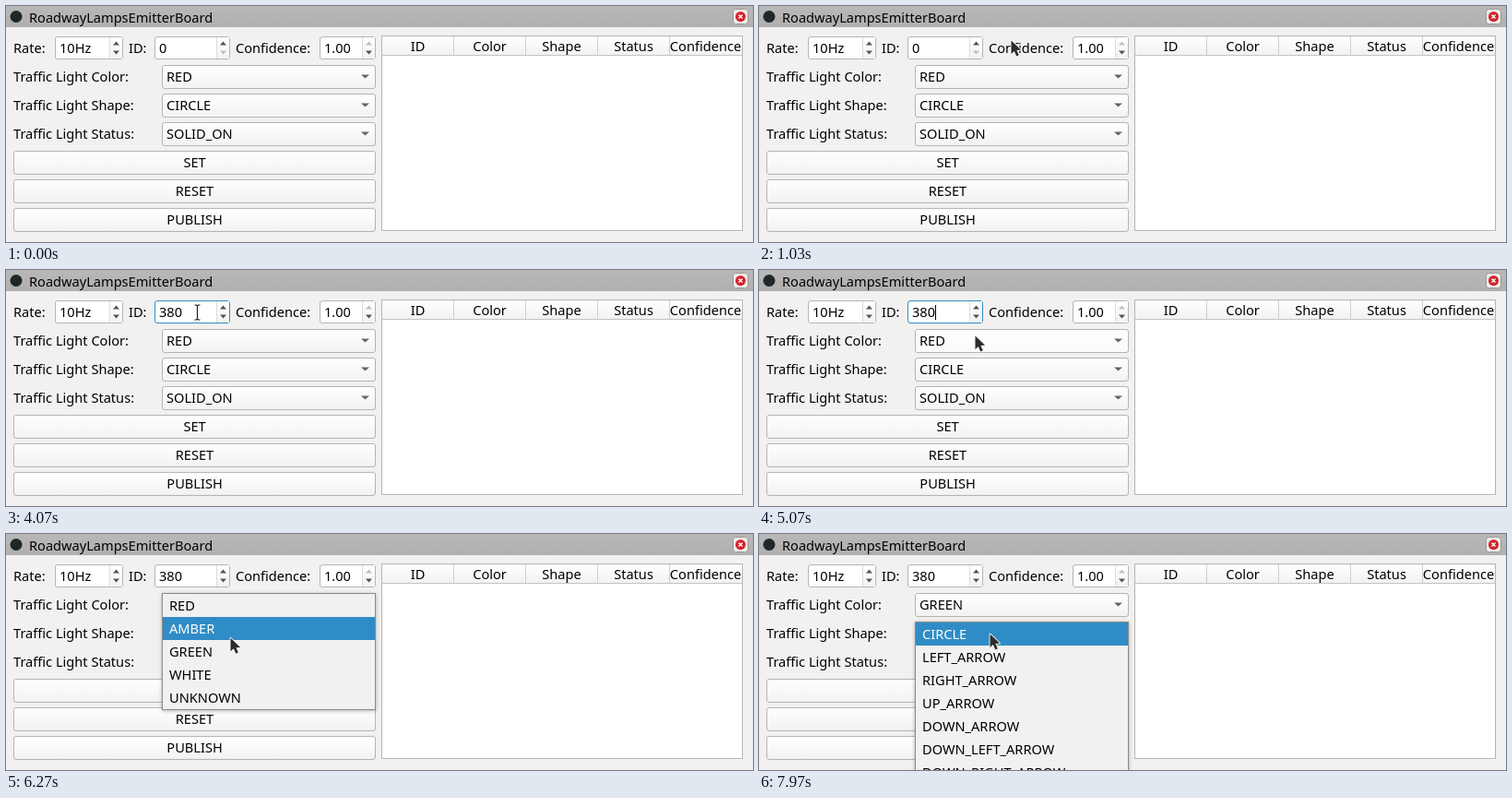
An HTML page with a canvas that plays this animation: 810 by 256 pixels, repeating every 8 s.

```html
<!DOCTYPE html>
<html lang="en">
<head>
<meta charset="utf-8">
<title>Panel</title>
<style>
html, body { margin: 0; width: 100%; height: 100%; overflow: hidden; background: #f2f1f0; }
canvas { display: block; width: 810px; height: 256px; }
</style>
</head>
<body>
<canvas id="stage" width="810" height="256"></canvas>
<script>
const ctx = document.getElementById('stage').getContext('2d');
const LOOP = 8000;
const INK = '#000', PANEL = '#f2f1f0', EDGE = '#b5b4b2', BLUE = '#308cc6';
const MARK = '#55554f', FADED = '#c0bfbd';
const COLORS = ['RED', 'AMBER', 'GREEN', 'WHITE', 'UNKNOWN'];
const SHAPES = ['CIRCLE', 'LEFT_ARROW', 'RIGHT_ARROW', 'UP_ARROW', 'DOWN_ARROW',
  'DOWN_LEFT_ARROW', 'DOWN_RIGHT_ARROW'];
const BLINK = 600;
const T = {
  focus: 1750, select: 1950, keys: [2570, 3170, 3470],
  openColor: 5200, pickColor: 6730, openShape: 7380
};
// Pointer moves: start, end, from, to; it rests in between
const MOVES = [
  [30, 1030, [814, 236], [273, 37]],
  [1030, 1500, [273, 37], [207, 46]],
  [4330, 4950, [207, 46], [234, 71]],
  [5900, 6450, [234, 71], [246, 126]],
  [6970, 7270, [246, 126], [250, 108]]
];

function pointer(t) {
  const [t0, t1, a, b] = MOVES.findLast(m => m[0] <= t) || MOVES[0];
  const u = Math.min(1, Math.max(0, (t - t0) / (t1 - t0)));
  const e = u * u * (3 - 2 * u);
  return a.map((v, i) => v + (b[i] - v) * e);
}

function rect(x, y, w, h, fill) {
  ctx.fillStyle = fill;
  ctx.fillRect(x, y, w, h);
}

function text(s, x, y, color = INK, align = 'left') {
  ctx.fillStyle = color;
  ctx.textAlign = align;
  ctx.fillText(s, x, y);
}

function box(x, y, w, h, fill, edge = EDGE, r = 2.5) {
  ctx.beginPath();
  ctx.roundRect(x + .5, y + .5, w - 1, h - 1, r);
  ctx.fillStyle = fill;
  ctx.fill();
  ctx.strokeStyle = edge;
  ctx.lineWidth = 1;
  ctx.stroke();
}

function shade(y, h, top, bottom) {
  const g = ctx.createLinearGradient(0, y, 0, y + h);
  g.addColorStop(0, top);
  g.addColorStop(1, bottom);
  return g;
}

function disc(x, y, r, fill) {
  ctx.beginPath();
  ctx.arc(x, y, r, 0, 7);
  ctx.fillStyle = fill;
  ctx.fill();
}

function triangle(x, y, half, dir, color) {
  ctx.beginPath();
  ctx.moveTo(x - half, y - 2 * dir);
  ctx.lineTo(x + half, y - 2 * dir);
  ctx.lineTo(x, y + 2 * dir);
  ctx.fillStyle = color;
  ctx.fill();
}

function raised(x, y, w, h, hover) {
  box(x, y, w, h, shade(y, h, '#fff', hover ? '#fbfafa' : '#f3f2f1'));
}

function button(label, y) {
  raised(8, y, 393, 26);
  text(label, 204.5, y + 18, INK, 'center');
}

function combo(label, y, hover) {
  raised(169, y, 232, 26, hover);
  text(label, 174, y + 18);
  triangle(389.5, y + 12.5, 4.5, 1, '#666560');
}

function spin(x, w, value, up, down, focused) {
  box(x, 33, w, 25, '#fff', focused ? BLUE : EDGE);
  const sx = x + w - 15;
  rect(sx, 34, 14, 23, shade(34, 23, '#fff', '#f3f2f1'));
  rect(sx, 34, 1, 23, '#dddcda');
  triangle(sx + 7.5, 40.5, 3.5, -1, up ? MARK : FADED);
  triangle(sx + 7.5, 50.5, 3.5, 1, down ? MARK : FADED);
  text(value, x + 5, 51);
}

function popup(items, y, current) {
  const h = items.length * 25 + 2;
  ctx.save();
  ctx.shadowColor = 'rgba(40,40,40,.35)';
  ctx.shadowBlur = 4;
  ctx.shadowOffsetY = 1;
  rect(169, y, 232, h, '#8b8a88');
  ctx.restore();
  rect(170, y + 1, 230, h - 2, PANEL);
  items.forEach((s, i) => {
    const top = y + 1 + i * 25;
    if (i === current) rect(170, top, 230, 25, BLUE);
    text(s, 177, top + 18, i === current ? '#fff' : INK);
  });
}

function titleBar() {
  rect(0, 0, 810, 23, shade(0, 23, '#b9b8b7', '#b1b0af'));
  disc(11, 11.5, 6.5, '#20272b');
  text('RoadwayLampsEmitterBoard', 25, 18);
  box(788, 3, 17, 17, '#eeedec', '#9a9998', 3);
  disc(796.5, 11.5, 5.5, '#d4222c');
  ctx.beginPath();
  ctx.moveTo(794.5, 9.5);
  ctx.lineTo(798.5, 13.5);
  ctx.moveTo(798.5, 9.5);
  ctx.lineTo(794.5, 13.5);
  ctx.strokeStyle = '#fff';
  ctx.lineWidth = 1.4;
  ctx.stroke();
}

function table() {
  rect(407, 32, 392, 212, EDGE);
  rect(408, 33, 390, 210, '#fff');
  rect(408, 33, 390, 20, shade(33, 20, '#fff', '#f3f2f1'));
  rect(408, 53, 390, 1, '#c5c4c2');
  ['ID', 'Color', 'Shape', 'Status', 'Confidence'].forEach((s, i) => {
    const x = 408 + i * 78;
    ctx.save();
    ctx.beginPath();
    ctx.rect(x, 33, 77, 20);
    ctx.clip();
    text(s, x + 38.5, 49, INK, 'center');
    ctx.restore();
    if (i < 4) rect(x + 77, 33, 1, 20, '#d0cfcd');
  });
}

function idField(t) {
  const typed = T.keys.filter(k => t >= k).length;
  const value = typed ? '380'.slice(0, typed) : '0';
  const focused = t >= T.focus && t < T.openColor;
  spin(161, 82, value, true, typed > 0, focused);
  if (!focused) return;
  if (t >= T.select && !typed) {
    rect(166, 38, 9, 16, BLUE);
    text('0', 166, 51, '#fff');
  } else {
    const since = t - (typed ? T.keys[typed - 1] : T.focus);
    const shown = since % (2 * BLINK) < BLINK;
    if (shown) rect(Math.round(166 + ctx.measureText(value).width), 38, 1, 16, INK);
  }
}

function beam(x, y) {
  ctx.beginPath();
  for (const s of [-1, 1]) {
    ctx.moveTo(x - 3, y + 8 * s);
    ctx.lineTo(x - 1, y + 8 * s);
    ctx.lineTo(x, y + 7 * s);
    ctx.lineTo(x + 1, y + 8 * s);
    ctx.lineTo(x + 3, y + 8 * s);
  }
  ctx.moveTo(x, y - 7);
  ctx.lineTo(x, y + 7);
  ctx.strokeStyle = '#fff';
  ctx.lineWidth = 3;
  ctx.stroke();
  ctx.strokeStyle = '#1c1c1c';
  ctx.lineWidth = 1.2;
  ctx.stroke();
}

function arrow(x, y) {
  ctx.save();
  ctx.translate(x, y);
  ctx.beginPath();
  ctx.moveTo(.5, .5);
  ctx.lineTo(.5, 15);
  ctx.lineTo(3.8, 12);
  ctx.lineTo(6.3, 17.5);
  ctx.lineTo(8.8, 16.3);
  ctx.lineTo(6.4, 11);
  ctx.lineTo(11, 10.6);
  ctx.closePath();
  ctx.lineJoin = 'round';
  ctx.strokeStyle = '#f6f6f6';
  ctx.lineWidth = 1.8;
  ctx.stroke();
  ctx.fillStyle = '#2c2c2c';
  ctx.fill();
  ctx.restore();
}

function draw(t) {
  const [px, py] = pointer(t);
  const colorOpen = t >= T.openColor && t < T.pickColor;
  const shapeOpen = t >= T.openShape;
  const over = y => !colorOpen && !shapeOpen && px >= 169 && px < 401 && py >= y && py < y + 26;

  ctx.font = '14.6px "Noto Sans", "Open Sans", sans-serif';
  rect(0, 0, 810, 256, PANEL);
  titleBar();

  text('Rate:', 8, 51);
  spin(53, 74, '10Hz', true, true);
  text('ID:', 133, 51);
  idField(t);
  text('Confidence:', 249, 51);
  spin(340, 61, '1.00', false, true);

  ['Color', 'Shape', 'Status'].forEach((s, i) => text(`Traffic Light ${s}:`, 8, 82 + i * 31));
  combo(t < T.pickColor ? 'RED' : 'GREEN', 64, over(64));
  combo('CIRCLE', 95, over(95));
  combo('SOLID_ON', 126, over(126));
  ['SET', 'RESET', 'PUBLISH'].forEach((s, i) => button(s, 157 + i * 31));
  table();

  if (colorOpen) popup(COLORS, 64, Math.max(0, Math.floor((py - 65) / 25)));
  if (shapeOpen) popup(SHAPES, 95, 0);

  const inField = px > 161 && px < 228 && py > 33 && py < 58;
  if (inField) beam(Math.round(px) + .5, py);
  else arrow(px, py);
}

function frame(now) {
  draw(now % LOOP);
  requestAnimationFrame(frame);
}
requestAnimationFrame(frame);
</script>
</body>
</html>
```
